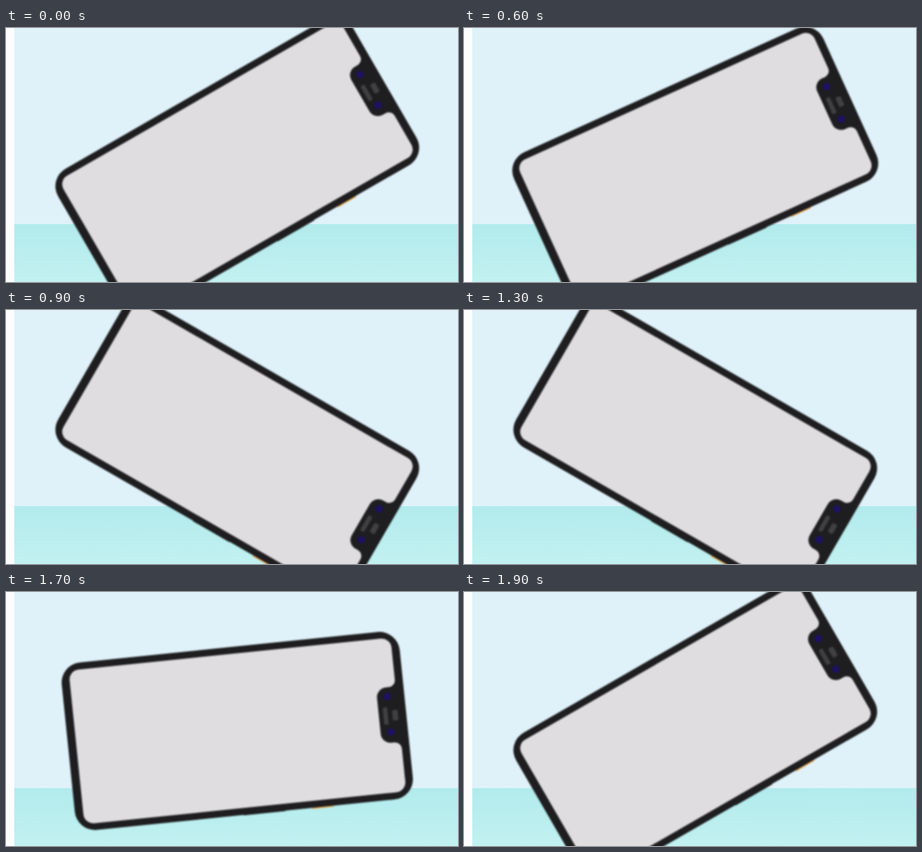
Write an HTML page that moves like this. It is 600 px wide and 338 px high and loops after 2000 ms.

```html
<!DOCTYPE html>
<html lang="en">
<head>
<meta charset="utf-8">
<title>Rotating phone</title>
<style>
  html, body { margin: 0; width: 100%; height: 100%; overflow: hidden; background: #fdfdfe; }
  svg { display: block; width: 100%; height: 100%; }
</style>
</head>
<body>
<svg viewBox="0 0 600 338">
  <defs>
    <linearGradient id="water" x1="0" y1="0" x2="0" y2="1">
      <stop offset="0" stop-color="#b2ebec"/>
      <stop offset="1" stop-color="#c2f1f1"/>
    </linearGradient>
    <filter id="soften" x="-5%" y="-5%" width="110%" height="110%" color-interpolation-filters="sRGB">
      <feGaussianBlur stdDeviation="0.9"/>
    </filter>
  </defs>

  <rect x="11" width="589" height="261" fill="#dff2fa"/>
  <rect x="11" y="261" width="589" height="77" fill="url(#water)"/>

  <g filter="url(#soften)">
    <g id="phone">
      <rect x="89" y="109" width="28" height="4.5" fill="#efa94a"/>
      <rect x="-3" y="109" width="56" height="3.6" fill="#1e1d1f"/>
      <rect x="-225.5" y="-112" width="451" height="224" rx="27" fill="#1e1d1f"/>
      <!-- screen with the notch cut out of its right side -->
      <path fill="#dfdde0" d="M-201.5-102.8 H202 a13 13 0 0 1 13 13 V-46.5
        a9 9 0 0 1 -9 9 H202 a13 13 0 0 0 -13 13 V23.5
        a13 13 0 0 0 13 13 H206 a9 9 0 0 1 9 9 V89.8
        a13 13 0 0 1 -13 13 H-201.5 a13 13 0 0 1 -13 -13 V-89.8 a13 13 0 0 1 13 -13 Z"/>
      <g fill="#1d1266">
        <circle cx="202.8" cy="-25" r="4.8"/>
        <circle cx="202.8" cy="22.2" r="4.8"/>
      </g>
      <g fill="#403f41">
        <rect x="195" y="-11" width="6" height="23" rx="1.5"/>
        <rect x="207" y="-6.5" width="7.5" height="14" rx="2"/>
      </g>
    </g>
  </g>
</svg>
<script>
const LOOP = 2000, STEP = 100, SWING = 311, TILT = 30;
const SWING_RIGHT = 546.5, SWING_LEFT = 1578;
const phone = document.getElementById('phone');

// cubic-bezier(0.4, 0, 0.2, 1), solved for x by bisection
function ease(x) {
  if (x <= 0) return 0;
  if (x >= 1) return 1;
  let low = 0, high = 1;
  for (let i = 0; i < 24; i++) {
    const s = (low + high) / 2, r = 1 - s;
    if (3 * s * r * r * 0.4 + 3 * s * s * r * 0.2 + s * s * s < x) low = s;
    else high = s;
  }
  return low * low * (3 - 2 * low);
}

function angleAt(time) {
  const turned = ease((time - SWING_RIGHT) / SWING) - ease((time - SWING_LEFT) / SWING);
  return TILT * (2 * turned - 1);
}

function draw(elapsed) {
  const time = Math.floor((elapsed % LOOP) / STEP) * STEP;
  phone.setAttribute('transform', `translate(307 184.9) rotate(${angleAt(time).toFixed(3)})`);
}

const start = performance.now();
function tick() {
  draw(performance.now() - start);
  requestAnimationFrame(tick);
}
tick();
</script>
</body>
</html>
```
